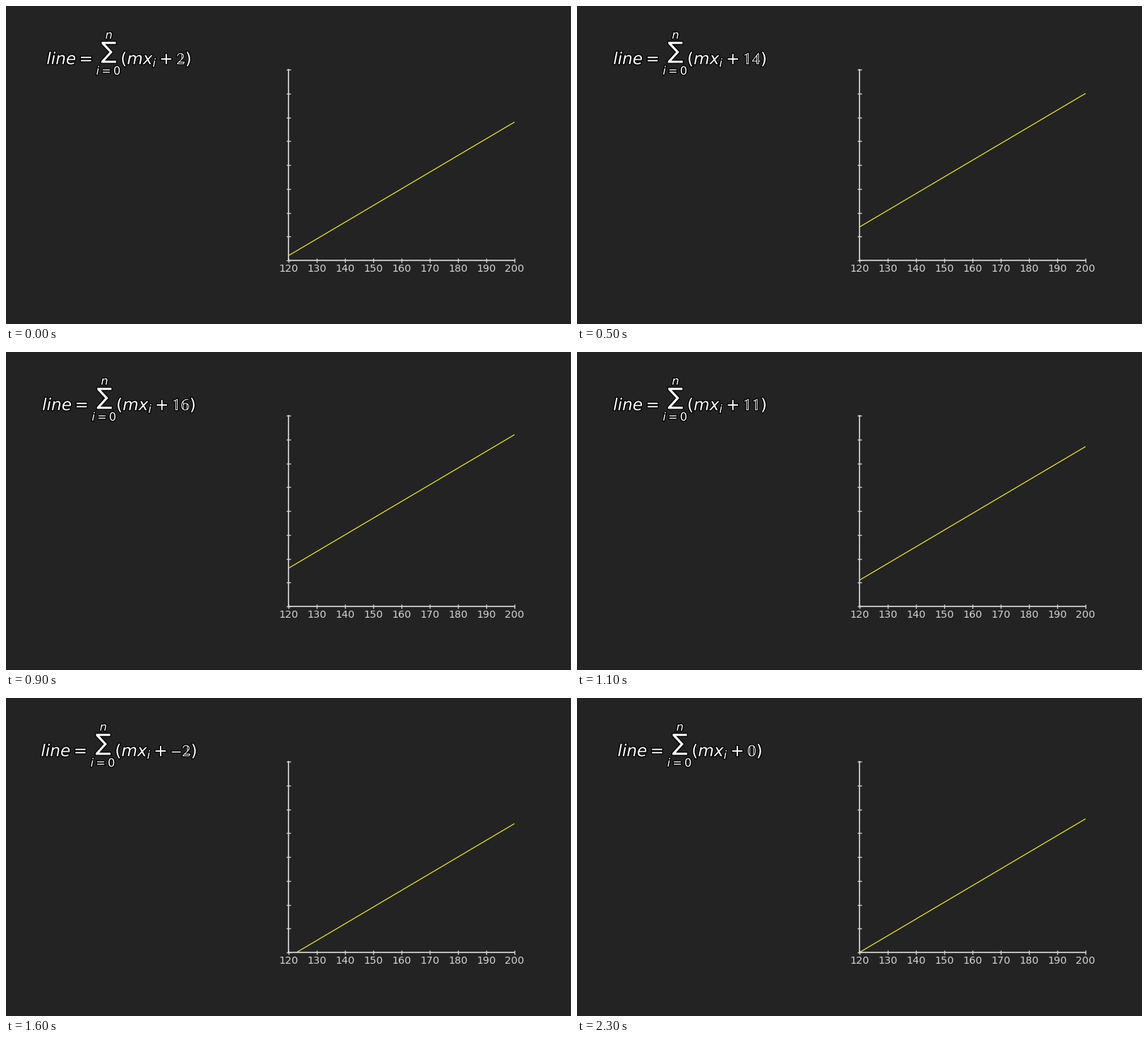
These frames come from a looping animation (800 by 450 pixels, 4 s). A matplotlib script:

```python
import numpy as np
import matplotlib.pyplot as plt
from matplotlib.animation import FuncAnimation
from matplotlib.patheffects import withStroke

STEP = 100      # ms per frame
FRAMES = 40
SLOPE = 0.7
GREY = "lightgrey"
SIZE = 50 / 3               # formula size in points
EM = SIZE * 100 / 72        # and in pixels

plt.rcParams["font.family"] = "DejaVu Sans"
plt.rcParams["mathtext.fontset"] = "dejavusans"

fig = plt.figure(figsize=(8, 4.5), dpi=100, facecolor="#232323")
ax = fig.add_axes([0.5, 0.2, 0.4, 0.6], facecolor="none")
ax.set(xlim=(120, 200), ylim=(0, 80))
ax.set_xticks(range(120, 201, 10))
ax.set_yticks(range(0, 81, 10))
ax.tick_params(direction="inout", color=GREY, labelcolor=GREY,
               length=4.5, width=1, labelsize=10.4, pad=1.1)
ax.tick_params(axis="y", labelleft=False)
for side in ("top", "right"):
    ax.spines[side].set_visible(False)
for side in ("left", "bottom"):
    ax.spines[side].set(color=GREY, linewidth=1.25)

x = np.array([120, 200])
line, = ax.plot(x, x, color="#fff035", lw=0.83)


def math(s, px, py, ha, va):
    return fig.text(px / 800, py / 450, s, color="white", fontsize=SIZE,
                    ha=ha, va=va,
                    path_effects=[withStroke(linewidth=2, foreground="black")])


# The sum is set apart so that its foot rests on the baseline of the rest.
total = math(r"$\sum_{i=0}^n$", 160, 382.5, "left", "center")
foot = total.get_window_extent().y0 + 0.773 * EM
body = math("", 160, foot, "center", "baseline")


def offset(i):
    """Up to 20, down to -9, back to 0, then rest: 2.5 units per frame."""
    pos = min(2 + 5 * i // 2, 58)
    if pos <= 20:
        return pos
    return 40 - pos if pos <= 49 else pos - 58


def draw(i):
    c = offset(i)
    line.set_ydata(SLOPE * (x - 120) + c)
    body.set_text(r"$line = \hspace{1.539}(mx_i + \mathbb{%d})$" % c)
    total.set_x((body.get_window_extent().x0 + 3.033 * EM) / 800)
    return line, body, total


anim = FuncAnimation(fig, draw, frames=FRAMES, interval=STEP,
                     init_func=lambda: draw(0), repeat=True, repeat_delay=0)
plt.show()
```
